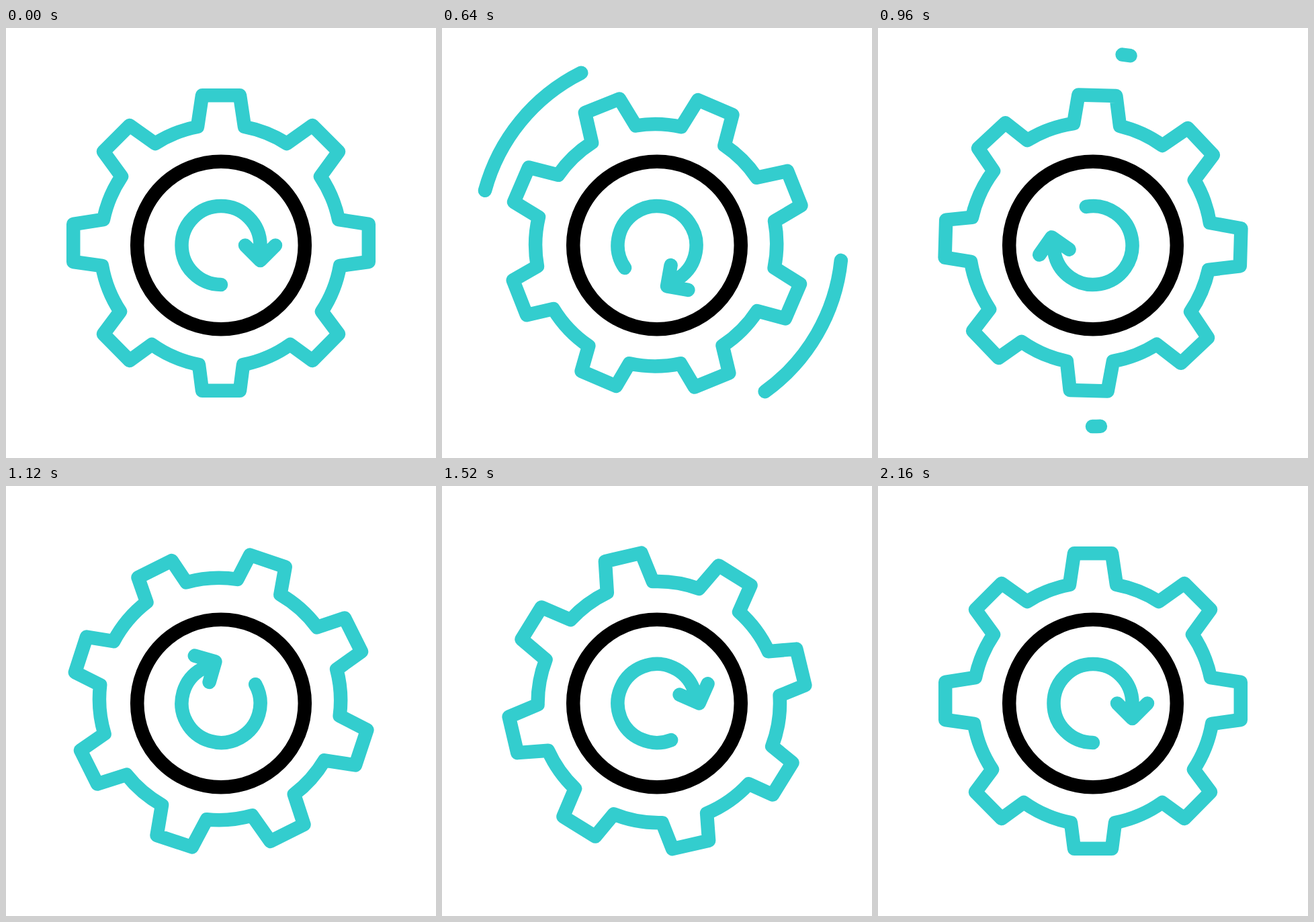
These frames come from a looping animation (640 by 640 pixels, 2240 ms). An HTML page:

```html
<!DOCTYPE html>
<html lang="en">
<head>
<meta charset="utf-8">
<title>Turning gear</title>
<style>
  html, body { margin: 0; width: 100%; height: 100%; overflow: hidden; background: #fff; }
  svg { display: block; width: 100%; height: 100%; }
  path, circle { fill: none; stroke: #33cdce; stroke-width: 20.5; stroke-linecap: round; stroke-linejoin: round; }
  .hub { stroke: #000; }
</style>
</head>
<body>
<svg viewBox="0 0 640 640">
  <path id="gear" d="M285 147 L292 100.3 H348 L355 147
    A180 180 0 0 1 418 172 L456 145 L495 184 L468 221
    A180 180 0 0 1 495 285 L539.8 292 V348 L497 354
    A180 180 0 0 1 470 422 L495 455.5 L456 495 L423 471
    A180 180 0 0 1 353 501 L348 539.7 H292 L287 501
    A180 180 0 0 1 217 471 L184 495 L145 455.5 L170 422
    A180 180 0 0 1 143 354 L100.2 348 V292 L145 285
    A180 180 0 0 1 172 221 L145 184 L184 145 L222 172
    A180 180 0 0 1 285 147 Z"/>
  <circle class="hub" cx="320" cy="323.5" r="124.8"/>
  <path id="arrow" d="M320 382 A58.5 58.5 0 1 1 378.5 323.5 V346 M356 323.5 L378.5 346 L401 323.5"/>
  <path id="streaks"/>
</svg>
<script>
  const LOOP = 2240, STEP = 40, EASE = 0.59;
  const SWEEP_FROM = 2, SWEEP = 97.3, SWEEP_TIME = 585;
  const $ = id => document.getElementById(id);
  const gear = $('gear'), arrow = $('arrow'), streaks = $('streaks');

  // Symmetric cubic-bezier(EASE, 0, 1 - EASE, 1), solved by bisection
  function ease(x) {
    if (x <= 0) return 0;
    if (x >= 1) return 1;
    let lo = 0, hi = 1;
    for (let i = 0; i < 30; i++) {
      const u = (lo + hi) / 2, v = 1 - u;
      const bx = 3 * u * v * (v * EASE + u * (1 - EASE)) + u * u * u;
      if (bx < x) lo = u; else hi = u;
    }
    return lo * lo * (3 - 2 * lo);
  }

  const progress = (t, start, duration) => ease((t - start) / duration);

  function arc(cx, cy, r, from, to) {
    const point = deg => {
      const a = deg * Math.PI / 180;
      return `${cx + r * Math.cos(a)} ${cy + r * Math.sin(a)}`;
    };
    return `M${point(from)} A${r} ${r} 0 0 1 ${point(to)}`;
  }

  function draw(t) {
    gear.setAttribute('transform', `rotate(${360 * progress(t, 200, 1960)} 320 320)`);
    arrow.setAttribute('transform', `rotate(${360 * progress(t, 35, 1893)} 320 323.5)`);

    const head = SWEEP_FROM + SWEEP * progress(t, 315, SWEEP_TIME);
    const tail = SWEEP_FROM + SWEEP * progress(t, 462, SWEEP_TIME);
    streaks.setAttribute('d', head - tail < 0.01 ? '' :
      arc(330.8, 314, 276.4, 180 + tail, 180 + head) +
      arc(319.5, 317.3, 275.8, tail - 9.2, head - 9.2));
  }

  function tick() {
    const t = performance.now() % LOOP;
    draw(Math.floor(t / STEP) * STEP);
    requestAnimationFrame(tick);
  }
  tick();
</script>
</body>
</html>
```
